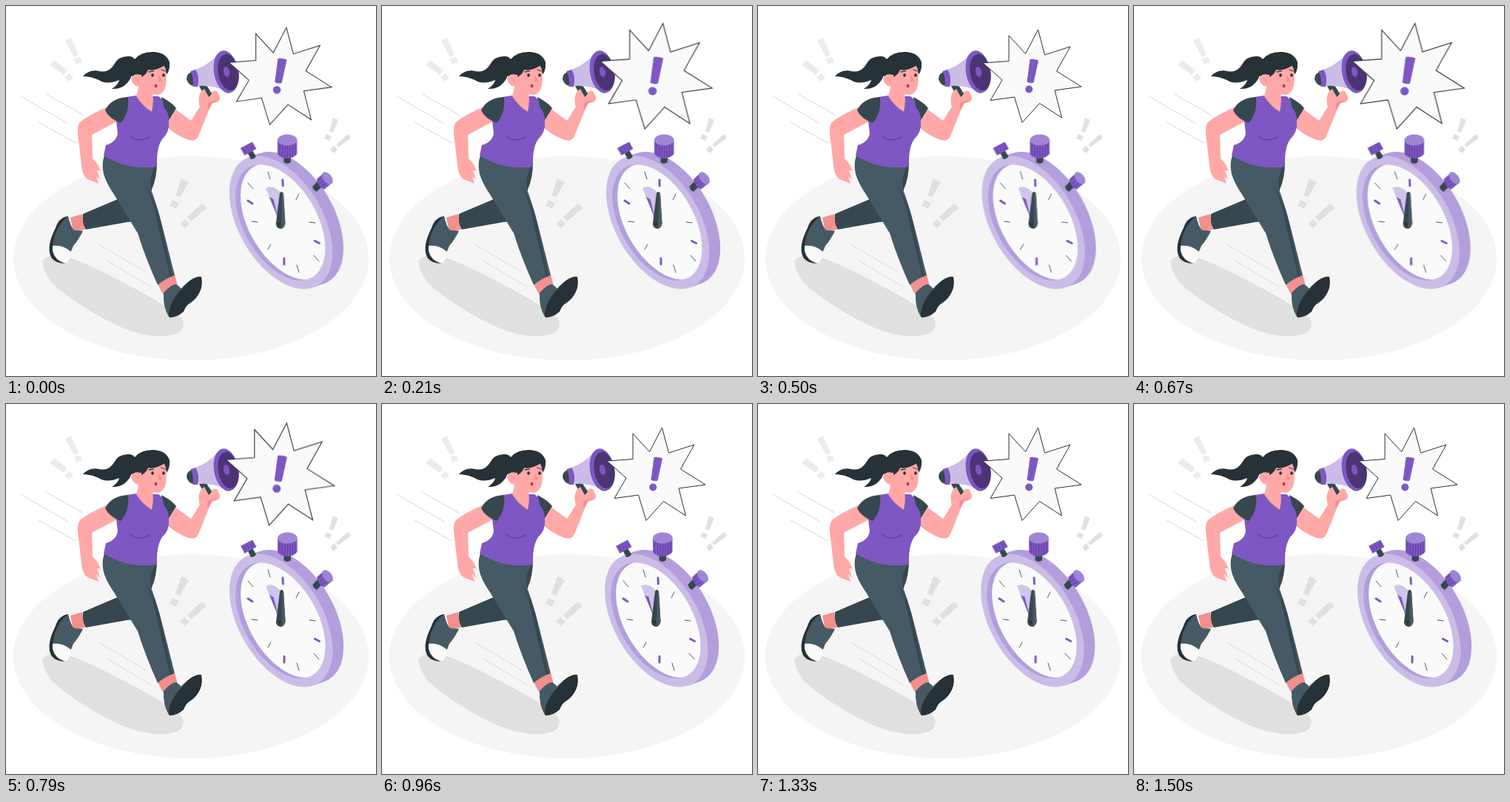
Animation, 500 px wide and 500 px high, one loop 1540 ms. Source, as an HTML page without scripts:

```html
<!DOCTYPE html>
<html lang="en">
<head>
<meta charset="utf-8">
<title>Runner with megaphone and stopwatch</title>
<style>
  html, body { margin: 0; width: 100%; height: 100%; overflow: hidden; background: #fff; }
  svg { display: block; width: 100%; height: 100%; }

  .purple { fill: #7e57c2; }
  .plum { fill: #4c3474; }
  .lilac { fill: #b39ddb; }
  .pale { fill: #cbbce7; }
  .skin { fill: #ffa8a7; }
  .blush { fill: #f28f8f; }
  .ink { fill: #263238; }
  .slate { fill: #37474f; }
  .steel { fill: #455a64; }
  .paper { fill: #fafafa; }
  .line { fill: none; stroke: #37474f; stroke-linecap: round; }
  .rib { fill: none; stroke: #5e3d9c; stroke-width: .9; }

  .bubble { transform-origin: 370.5px 94.5px; animation: heartbeat 1540ms linear infinite; }
  .watch { animation: shake 1540ms linear infinite; }

  @keyframes heartbeat {
    0% { transform: scale(1.044); }
    7.6%, 46.56% { transform: scale(1.2); }
    27.08%, 36.82%, 56.3%, 100% { transform: scale(1); }
  }
  @keyframes shake {
    0% { transform: translateX(-.22px); }
    7.6%, 85.52% { transform: translateX(-1px); }
    17.34%, 75.78% { transform: translateX(2px); }
    27.08%, 46.56%, 66.04% { transform: translateX(-4px); }
    36.82%, 56.3% { transform: translateX(4px); }
    95.26%, 100% { transform: none; }
  }
</style>
</head>
<body>
<svg viewBox="0 0 500 500">
  <clipPath id="opening"><circle r="70" transform="matrix(.866 .5 0 1 371 292.5)"/></clipPath>

  <!-- floor, shadow and accents -->
  <ellipse cx="250" cy="341" rx="240" ry="138" fill="#f5f5f5"/>
  <path fill="#e0e0e0" d="M50 351C46 338 65 335 82 339C110 346 195 392 228 413C243 423 243 436 232 442C215 450 185 446 158 435C123 420 82 393 64 376C56 367 52 358 50 351Z"/>
  <path fill="none" stroke="#e0e0e0" stroke-width="1.2" d="M20 122L84 159M54 119L104 147M44 157L94 185M125 322L190 360M136 344L197 380"/>
  <path fill="#ebebeb" d="M80 47L88 43L98 66L92 69ZM92 72L100 69L103 76L95 79ZM65 73L83 87L78 93L59 80ZM85 91L91 96L85 102L79 97Z"/>
  <path fill="#e0e0e0" d="M237 233L247 238L235 259L229 256ZM225 262L234 266L230 274L221 270ZM265 267L271 273L250 291L245 285ZM241 288L248 294L242 300L235 294ZM442 151L449 154L442 171L437 169ZM433 173L440 176L437 182L430 179ZM462 173L466 178L449 191L446 187ZM443 188L448 194L443 199L438 194Z"/>

  <g class="watch">
    <circle class="lilac" r="80.5" transform="matrix(.866 .5 0 1 386.5 287)"/>
    <path class="lilac" d="M327.4 204.7L342.2 199.2L430.8 374.8L416 380.3Z"/>
    <circle class="pale" r="80.5" transform="matrix(.866 .5 0 1 371.7 292.5)"/>
    <g clip-path="url(#opening)">
      <path class="lilac" d="M300 200H450V390H300Z"/>
      <circle class="paper" r="70" transform="matrix(.866 .5 0 1 377.7 291.5)"/>
    </g>
    <path class="line" stroke-width=".9" d="M354 224L357 234M327 239L334 247M332 291L340 292M358 322L354 329M393 350L396 360M416 337L423 345M410 292L418 293M396 254L392 262"/>
    <path class="line" style="stroke:#7e57c2" stroke-width="3" d="M374 235L374.3 243M376 341V349M327 263L333 267M417.5 317.5L423.5 320.5"/>
    <path fill="#d1c4e9" d="M351 246Q360 241 370 251L367 286Z"/>
    <path class="purple" d="M356 258L361.5 261L368 287Z"/>
    <path class="slate" d="M370 253Q372 249 375 253L377.5 294Q376 301 371 301Q365 300 365 294Z"/>
    <path class="steel" d="M373 251.5L375 253L377.5 294Q376 300 372 301Z"/>
    <circle class="ink" cx="369.5" cy="294.5" r="2"/>

    <!-- crown and side buttons -->
    <path class="slate" d="M375.5 202H385V211Q380 215 375.5 211Z"/>
    <path class="purple" d="M367 181H393.5V200Q388 206 380.3 206Q372 206 367 200Z"/>
    <path class="rib" d="M370 186V202M373.5 188V204M377 189V205M380.5 189V205.5M384 189V205M387.5 188V204M391 186V202"/>
    <ellipse cx="380.3" cy="181" rx="13.3" ry="7.5" fill="#a184d3"/>
    <path class="slate" d="M327 199L333 195L338 203Q336 207 331 207Z"/>
    <path class="purple" d="M317 192L333 183.500L338.500 193L322.500 202Z"/>
    <path class="rib" d="M321 191L325 199M325 189L329 197M329 187L333 195M332 186L336 193"/>
    <path class="slate" d="M421 237L427 244L420 251Q415 249 414.5 244Z"/>
    <path class="purple" d="M420 234L430 225L442 238L430 248Q422 244 420 234Z"/>
    <path class="rib" d="M421 237L428 230M423 241L431 234M426 245L434 238"/>
    <ellipse cx="434.5" cy="232.5" rx="5.8" ry="9.500" transform="rotate(-38 434.5 232.5)" fill="#a184d3"/>
  </g>

  <!-- back leg -->
  <path class="slate" d="M204 211Q204 232 197 248L186 290L164 292L108 302Q102 294 104 281L158 258L180 215Z"/>
  <path class="blush" d="M87 286L103 281Q103 293 107 302L91 306Z"/>
  <path class="steel" d="M84 284Q87 298 92 303L104 304Q98 316 91 324L87 334L62 325Q64 302 71 291Q78 284 84 284Z"/>
  <path class="paper" d="M63 324Q76 322 88 332Q88 344 80 348Q64 347 62 332Z"/>
  <path class="ink" d="M84 284Q72 286 67 300C58 317 56 332 62 341Q68 348 80 348Q66 344 63 331C62 313 72 292 84 284Z"/>

  <!-- front leg -->
  <path class="blush" d="M204 374L228 363L232 379L213 391Z"/>
  <path class="steel" d="M134 199C127 217 131 232 145 253L178 307Q189 342 205 377Q215 368 228 364L208 285Q201 260 195 246Q194 228 204 212Z"/>
  <path class="slate" d="M185 234Q205 270 209 292L225 365L222 366L206 300Q200 262 185 234Z"/>
  <path class="steel" d="M213 388Q223 376 230 376L237 381L246 373L236 410L220 420Q212 407 213 388Z"/>
  <path class="paper" d="M231 376L240 373L237 382Z"/>
  <path class="ink" d="M264 366C267 379 262 393 248 402Q243 405 240 413Q231 421 221 421C217 412 226 394 239 381C246 371 257 364 264 366Z"/>

  <!-- raised arm and megaphone -->
  <path class="skin" d="M224 136L250 155L262 136L276 136L260 176Q256 184 247 181Q232 176 218 164Z"/>
  <path class="slate" d="M261 108L270 106L278 118L274 123L268 121Z"/>
  <path class="slate" d="M254 88Q244 90 244 99Q247 109 257 108Z"/>
  <path class="pale" d="M256 86Q275 79 286 65L298 115Q277 106 258 108Z"/>
  <path class="purple" d="M249.500 88L256.500 86Q262 96 259 109L252.500 109Q254 98 249.500 88Z"/>
  <ellipse class="purple" cx="297.5" cy="89" rx="16.5" ry="29" transform="rotate(-10 297.5 89)"/>
  <ellipse class="plum" cx="300.5" cy="89.5" rx="13.8" ry="25" transform="rotate(-10 300.5 89.5)"/>
  <ellipse class="purple" cx="298" cy="89" rx="4" ry="7" transform="rotate(-10 298 89)"/>
  <path class="skin" d="M262 137Q258 124 264 115Q270 109 273 113L277 122L279 115Q286 113 287 119Q291 125 287 129L279 131L274 140Z"/>
  <path class="slate" d="M267 110L272 110L278 119L274 123Z"/>
  <path class="blush" d="M272 132Q279 126 287 129L279 131L273 141Z"/>

  <!-- trailing arm -->
  <path class="skin" d="M138 136Q112 147 100 157Q96 162 97 172L102 216Q103 229 110 234L125 240L122 230L127 235L123 222L128 223Q124 212 117 206L116 174L150 156Z"/>

  <!-- torso -->
  <path class="slate" d="M210 123Q225 131 230 138L219 156Q211 143 210 123Z"/>
  <path class="purple" d="M163 123L176 121L206 122Q213 126 213 136Q221 145 220 157Q221 171 211 180Q203 192 204 217Q166 223 132 202L135 188Q149 184 151 172L149 156Z"/>
  <path class="slate" d="M165 123Q142 124 134 141Q139 152 155 158Q167 145 165 123Z"/>
  <path fill="none" stroke="#553a83" d="M167 176Q178 186 195 177"/>
  <path class="skin" d="M180 106L176 122Q184 135 197 143Q200 130 198 116Z"/>

  <!-- head -->
  <path class="ink" d="M104 95Q113 85 126 88Q139 91 146 79Q152 67 167 68Q171 68 174 72Q182 62 198 62Q216 62 221 76Q221 84 216 91L210 83L188 102L178 106L170 94Q162 113 143 112Q152 106 153 100Q139 106 129 102Q117 95 104 95Z"/>
  <path class="skin" d="M190 85Q198 90 215 80Q218 94 216 107Q214 119 204 120Q189 120 183 109Q172 110 169 99Q171 90 182 93Q189 92 190 85Z"/>
  <path class="ink" d="M183 96Q191 92 193 83Q204 87 212 79Q217 84 217 93Q223 84 220 75L208 66L184 74Z"/>
  <path class="blush" d="M207 93L211 102L206 102Z"/>
  <path class="line" stroke-width="1.3" d="M193 89L199 88M210 86L215 88"/>
  <ellipse class="ink" cx="198" cy="93.5" rx="1.8" ry="2.2"/>
  <ellipse class="ink" cx="213" cy="93.5" rx="1.8" ry="2.2"/>
  <ellipse cx="202.5" cy="108" rx="1.8" ry="2.2" fill="#a13f4b"/>
  <path fill="none" stroke="#f28f8f" d="M173 97Q179 97 179 104"/>

  <g class="bubble">
    <path class="paper" stroke="#263238" d="M378.5 32L387.5 66L422 55L403.5 88L437 109L401 114L410.5 151L380.5 131.5L357 157.5L346.5 123L314 127.5L330 100L304 77L339 74.5L339 40L361.5 64.5Z"/>
    <path class="purple" d="M367.5 72Q373 71 379 73.5L372.500 103.5Q368 105 363.5 102.500Z"/>
    <circle class="purple" cx="366.2" cy="112.5" r="5"/>
  </g>
</svg>
</body>
</html>
```
